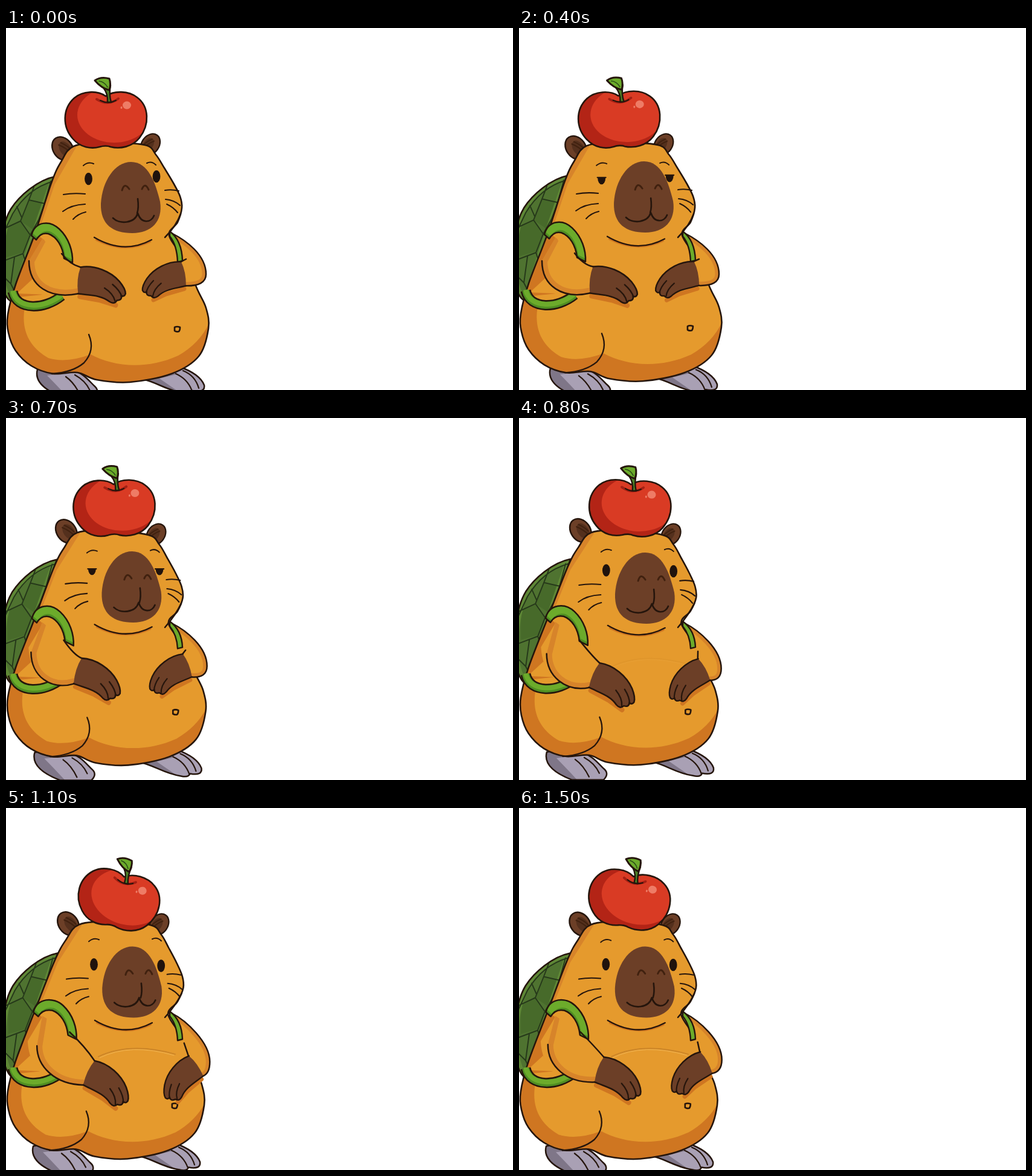
An HTML page with a canvas for the animation above (1.6 s loop, 839x600 px).

```html
<!DOCTYPE html>
<html lang="en">
<head>
<meta charset="utf-8">
<title>Capybara with an apple</title>
<style>
html, body { margin: 0; width: 100%; height: 100%; overflow: hidden; background: #fff; }
canvas { display: block; width: 839px; height: 600px; }
</style>
</head>
<body>
<canvas id="stage" width="839" height="600"></canvas>
<script>
const g = document.getElementById('stage').getContext('2d');
const LOOP = 1600, STEP = 100;
const INK = '#25150c', FUR = '#e59a2d', DIM = '#d7842a', SHADE = '#cf7621';
const BROWN = '#6c3f27', DARK = '#40210f', GREEN = '#6cab2b';

const clamp = v => Math.max(0, Math.min(1, v));
const ease = (t, from, to) => {
  const k = clamp((t - from) / (to - from));
  return k * k * (3 - 2 * k);
};

// The whole pose follows a sway to the right, one deep breath and a reach of the paws
function poseAt(t) {
  const rise = ease(t, 350, 930), settle = ease(t, 1150, 1550);
  const breath = ease(t, 300, 650) - ease(t, 750, 1050);
  const sway = rise - 0.2 * settle, reach = ease(t, 550, 1000) - 0.27 * settle;
  return {
    turn: 9 * sway,
    tilt: 14 * sway - 10 * breath,
    appleX: 165 + 21 * sway,
    appleY: 152 - 3 * breath,
    nod: 7.5 * rise - 6 * breath,
    lift: -5.5 * rise - 8 * breath,
    lean: -7 * rise,
    fold: ease(t, 700, 1050),
    drop: 33 * reach,
    left: { x: 159 + 11 * reach - 8 * breath, y: 426 + 33 * reach, deg: 20 * reach + 7 * breath, size: 1.02 },
    right: { x: 260 + 4 * sway + 24 * reach, y: 418 + 33 * reach, deg: -6 - 24 * reach - 4 * breath, size: 0.94 },
    open: 1 - ease(t, 230, 600) + ease(t, 600, 800)
  };
}

const svg = d => new Path2D(d);

// Closed smooth curve through points
function blob(pts) {
  const n = pts.length, path = new Path2D(), at = i => pts[(i + n) % n];
  path.moveTo(...pts[0]);
  for (let i = 0; i < n; i++) {
    const [a, b, c, d] = [at(i - 1), at(i), at(i + 1), at(i + 2)];
    path.bezierCurveTo(b[0] + (c[0] - a[0]) / 6, b[1] + (c[1] - a[1]) / 6,
      c[0] - (d[0] - b[0]) / 6, c[1] - (d[1] - b[1]) / 6, ...c);
  }
  path.closePath();
  return path;
}

// Head follows the turn, belly and left side follow the breath
function warp(p, x, y) {
  const head = clamp((330 - y) / 120), belly = clamp((y - 300) / 150);
  return [x + p.turn * head + p.lean * belly * x / 335,
    y + p.lift * Math.max(belly, clamp(1 - x / 230))];
}

function fill(path, color) {
  g.fillStyle = color;
  g.fill(path);
}

function ink(path, width = 2.5, color = INK) {
  g.strokeStyle = color;
  g.lineWidth = width;
  g.stroke(path);
}

function shape(path, color, width) {
  fill(path, color);
  ink(path, width);
}

function oval(x, y, rx, ry) {
  const path = new Path2D();
  path.ellipse(x, y, rx, ry, 0, 0, 7);
  return path;
}

function group(x, y, draw, deg = 0, sx = 1, sy = 1) {
  g.save();
  g.translate(x, y);
  g.rotate(deg * Math.PI / 180);
  g.scale(sx, sy);
  draw();
  g.restore();
}

function clipped(path, draw) {
  g.save();
  g.clip(path);
  draw();
  g.restore();
}

// Point on a paw, given in the paw's own space
function onPaw({ x, y, deg, size }, px, py) {
  const a = deg * Math.PI / 180, c = Math.cos(a) * size, s = Math.sin(a) * size;
  return `${x + px * c - py * s} ${y + px * s + py * c}`;
}

function feet(p) {
  const foot = (outline, shade, toes) => {
    const path = svg(outline);
    fill(path, '#a9a0b4');
    clipped(path, () => fill(svg(shade), '#7f7688'));
    ink(path);
    ink(svg(toes), 2.2);
  };
  group(p.lean, p.lift, () => {
    foot('M52 566C46 588 68 602 94 612H146Q156 602 147 594C138 586 128 570 104 565L80 560Z',
      'M46 560Q50 600 106 616Q82 590 68 576L100 572V556Z',
      'M99 578Q113 588 122 607M114 575Q132 585 139 601');
    foot('M226 582C250 587 266 601 294 605Q307 608 309 601Q330 605 328 592C322 576 300 566 286 561Z',
      'M220 582Q262 604 296 610Q270 592 254 581L282 574V560Z',
      'M281 573Q301 582 308 602M293 568Q313 576 319 597');
  });
}

function shell(p) {
  group(p.turn * 0.4, p.lift, () => {
    const path = svg('M82 246C52 252 22 278 8 300C-10 330 -18 400 -4 436Q4 456 14 453L48 345Z');
    fill(path, '#4f7330');
    clipped(path, () => {
      fill(svg('M38 285L64 291L46 335L24 320ZM0 330L24 320L40 345L28 372L0 380Z'), '#476a2a');
      ink(path, 14, '#5f8836');
      ink(svg('M78 254Q36 266 11 308L-4 340M46 264L38 285L64 291L74 254M38 285L24 320L-4 333' +
        'M24 320L40 343L54 318L64 291M40 343L28 374L-4 386M28 374L34 392M18 296L26 314M14 380L8 424L-4 412M8 424L16 440'),
        2, '#26391a');
    });
    ink(path, 2.6);
  });
}

function ears(p) {
  const ear = (x, y, deg, flip, size) => group(x, y, () => {
    shape(oval(0, 0, 16, 21), BROWN);
    fill(oval(3, 3, 9, 14), '#54301d');
    ink(svg('M-2 -9Q5 2 7 14M3 -10Q9 0 10 8'), 2, DARK);
  }, deg, flip * size, size);
  ear(94 + p.turn, 200 + p.lift * 0.85 - p.turn * 0.4, -35, 1, 1);
  ear(239 + p.turn * 1.6, 193, 35, -1, 0.9);
}

function body(p) {
  const outline = [
    [112, 196], [165, 190], [230, 194], [248, 210], [262, 232], [277, 257], [288, 279], [291, 298], [284, 322],
    [270, 344], [296, 385], [317, 434], [331, 464], [335, 498], [319, 544], [274, 573], [205, 587], [150, 583],
    [118, 571], [78, 573], [42, 560], [16, 535], [4, 505], [3, 475], [16, 425], [47, 343], [75, 257], [91, 222]
  ];
  const path = blob(outline.map(([x, y]) => warp(p, x, y)));
  fill(path, FUR);
  clipped(path, () => {
    group(p.lean * 0.6, p.lift, () => {
      fill(svg('M34 450C20 500 40 530 70 547Q100 556 140 541C175 560 230 568 285 543Q325 520 340 480L360 620H-20V450Z'), SHADE);
      fill(svg('M48 340L64 352L40 392Q42 425 60 442L0 448Z'), SHADE);
      fill(svg('M44 416Q52 432 68 442L18 440Z'), FUR);
    });
    const [a, b, c] = [[110, 196], [75, 257], [47, 340]].map(q => warp(p, ...q).join(' '));
    ink(svg(`M${a}L${b}L${c}`), 12, DIM);
  });
  ink(path, 2.6);
  group(p.lean * 0.6, p.lift, () => {
    ink(svg('M137 508Q148 534 129 555Q110 571 76 573'), 2.3);
    ink(svg('M279 496Q283 494 288 496Q288 501 286 503Q282 504 279 502Z'), 2.6);
  });
  g.globalAlpha = p.fold;
  ink(svg('M153 412Q206 387 280 408'), 1.8, '#c98327');
  ink(svg('M155 414Q206 389 278 410'), 1, '#f1b554');
  g.globalAlpha = 1;
}

function lowStrap(p) {
  g.lineCap = 'butt';
  group(0, p.lift - 1, () => {
    const path = svg('M11 438C18 470 64 468 92 445');
    ink(path, 17);
    ink(path, 12, '#4f8e22');
    group(0, -1.5, () => ink(path, 8, GREEN));
  });
  g.lineCap = 'round';
}

function paw({ x, y, deg, size }, flip) {
  group(x, y, () => {
    const edge = 'M-35 -29C-12 -33 14 -22 28 -6Q38 6 38 14Q36 20 31 17Q33 25 24 25Q20 32 12 27C-2 16 -20 17 -39 14';
    fill(svg(edge + 'Q-42 -10 -35 -29Z'), BROWN);
    ink(svg(edge));
    ink(svg('M4 5Q18 14 21 26M17 -1Q29 9 32 19'), 2.3);
  }, deg, flip * size, size);
}

function leftArm(p) {
  const d = p.drop, ex = 38 + d * 0.4, ey = 386 + d * 0.25;
  const low = onPaw(p.left, -38, 14), high = onPaw(p.left, -35, -29);
  const elbow = `C${ex} 428 ${72 + d * 0.25} ${450 + d * 0.25} ${low}`;
  const start = `${92 + d * 0.4} ${374 + p.lift * 0.5}`, bend = `Q${106 + d * 0.75} ${392 + d * 0.1} `;
  group(2, 5, () => ink(svg(`M${low}L${onPaw(p.left, -5, 20)}L${onPaw(p.left, 20, 28)}`), 8, SHADE));

  const arm = svg(`M${ex} ${ey}${elbow}L${high}${bend}${start}L60 ${350 + p.lift}Z`);
  fill(arm, FUR);
  clipped(arm, () => ink(svg(`M60 ${345 + p.lift}L${ex} ${ey}${elbow}`), 18, DIM));
  ink(svg(`M${ex} ${ey}${elbow}`));

  const s = d * 0.2;
  group(0, p.lift, () => {
    const strap = svg(`M${42 + s / 2} 344C${48 + s / 2} 320 ${72 + s} 318 ${88 + s} 333C${104 + s} 348 ${111 + s} 370 ${110 + s} 389` +
      `L${96 + s} 382C${94 + s} 362 ${84 + s} 346 ${70 + s} 341Q${58 + s / 2} 338 ${50 + s / 2} 351Z`);
    fill(strap, '#4f8e22');
    clipped(strap, () => group(2, -4, () => fill(strap, GREEN)));
    ink(strap);
  });
  ink(svg(`M${start}${bend}${high}`));
  paw(p.left, 1);
}

function rightArm(p) {
  const edge = 331 + p.drop * 0.19, mid = 408 + p.drop * 0.38;
  const low = onPaw(p.right, 38, 14), high = onPaw(p.right, 34, -29);
  const outer = `M274 340C298 352 ${edge} ${mid - 32} ${edge} ${mid}Q${edge} ${mid + 20} ${low}`;
  const l = p.lift * 0.5;
  group(-2, 5, () => ink(svg(`M${low}L${onPaw(p.right, 5, 20)}L${onPaw(p.right, -18, 28)}`), 7, SHADE));
  const arm = svg(`${outer}L${high}L290 ${386 + l}L287 362Z`);
  fill(arm, FUR);
  clipped(arm, () => ink(svg(outer), 13, DIM));
  ink(svg(outer));
  shape(svg(`M271 337Q291 352 292 ${386 + l}L284 ${388 + l}Q283 360 271 345Z`), GREEN, 2.4);
  ink(svg(`M${298 - p.drop * 0.1} ${383 + p.drop * 0.2}L${high}`));
  paw(p.right, -1);
}

function eye(x, y, open) {
  if (open < 0.12) {
    ink(svg(`M${x - 7} ${y + 1}Q${x} ${y + 8} ${x + 7} ${y + 1}`), 2.2);
    return;
  }
  const lid = y - 10.5 + (1 - open) * 21, cut = new Path2D();
  cut.rect(x - 9, lid, 18, 30);
  clipped(cut, () => fill(oval(x, y, 6.4, 10.3), '#20130d'));
  if (open < 0.95) ink(svg(`M${x - 7} ${lid}H${x + 7}`), 2.2);
}

function face(p) {
  const { turn: r, nod } = p;
  eye(136.5 + r, 250 + nod + r * 0.2, p.open);
  eye(249 + r * 0.85, 246 + nod + r * 0.9, p.open);
  group(r, -r * 0.75, () => ink(svg('M128 228Q136 221 145 225M233 224Q241 220 248 227'), 2));
  group(r * 0.55, nod, () =>
    ink(svg('M95 276Q112 273 131 275M94 304Q108 293 131 292M111 317Q119 308 132 305'), 2.1));
  group(r * 0.4, nod * 0.9, () =>
    ink(svg('M263 269Q274 267 286 270M264 284Q278 285 288 294M266 292Q277 297 284 306'), 2.1));
  group(r * 0.25, nod, () => {
    fill(svg('M207 222C235 222 247 255 255 288C260 321 240 340 209 340C177 340 156 326 157 291C159 254 180 222 207 222Z'), BROWN);
    group(r * 0.4, 0, () => {
      ink(svg('M192 269Q196 255 204 267M225 267Q230 255 236 268'), 3, DARK);
      ink(svg('M218 283Q220 298 217 307'), 2.6);
    });
    ink(svg('M177 315C188 326 213 324 218 307C224 325 240 323 245 311'), 2.7);
  });
  group(r * 0.1, nod * 0.9 + p.lift * 0.33, () => {
    ink(svg('M150 351Q195 374 238 354'), 4, SHADE);
    ink(svg('M146 347Q195 376 241 351'), 2.3);
  });
  const [a, b] = [[289, 308], [282, 328]].map(q => warp(p, ...q).join(' '));
  ink(svg(`M${a}Q${b} 263 347`));
}

function apple(p) {
  group(p.appleX, p.appleY, () => {
    const path = svg('M0 -39C-14 -49 -38 -48 -52 -36C-72 -18 -72 12 -54 32C-42 46 -24 49 -10 45' +
      'C-4 43 4 43 8 45C24 49 44 45 56 30C73 8 72 -22 52 -37C38 -48 14 -49 0 -39Z');
    fill(path, '#b32416');
    clipped(path, () => fill(oval(14, -8, 61, 46), '#d93b24'));
    ink(path, 2.6);
    ink(svg('M-15 -34Q4 -22 21 -35'), 4, '#a32014');
    ink(svg('M-9 -32Q4 -25 17 -32'), 2);
    fill(oval(35, -24, 7, 6.5), '#ee7c66');
    fill(oval(26, -20, 1.5, 2), '#ee7c66');
    shape(svg('M3 -29Q4 -43 -4 -53L8 -57Q5 -42 9 -29Z'), '#4b8126', 2.4);
    shape(svg('M-18 -65Q-8 -72 6 -68Q9 -60 6 -49Q-7 -52 -18 -65Z'), GREEN, 3);
    ink(svg('M-11 -64Q-2 -63 3 -54'), 1.6, '#2c4c18');
  }, p.tilt);
}

function draw(t) {
  const p = poseAt(t);
  g.fillStyle = '#fff';
  g.fillRect(0, 0, 839, 600);
  g.lineJoin = g.lineCap = 'round';
  for (const part of [feet, shell, ears, body, lowStrap, leftArm, rightArm, face, apple]) part(p);
}

let last = -1;
function tick(now) {
  const t = Math.floor(now % LOOP / STEP) * STEP;
  if (t !== last) draw(last = t);
  requestAnimationFrame(tick);
}
draw(0);
requestAnimationFrame(tick);
</script>
</body>
</html>
```
